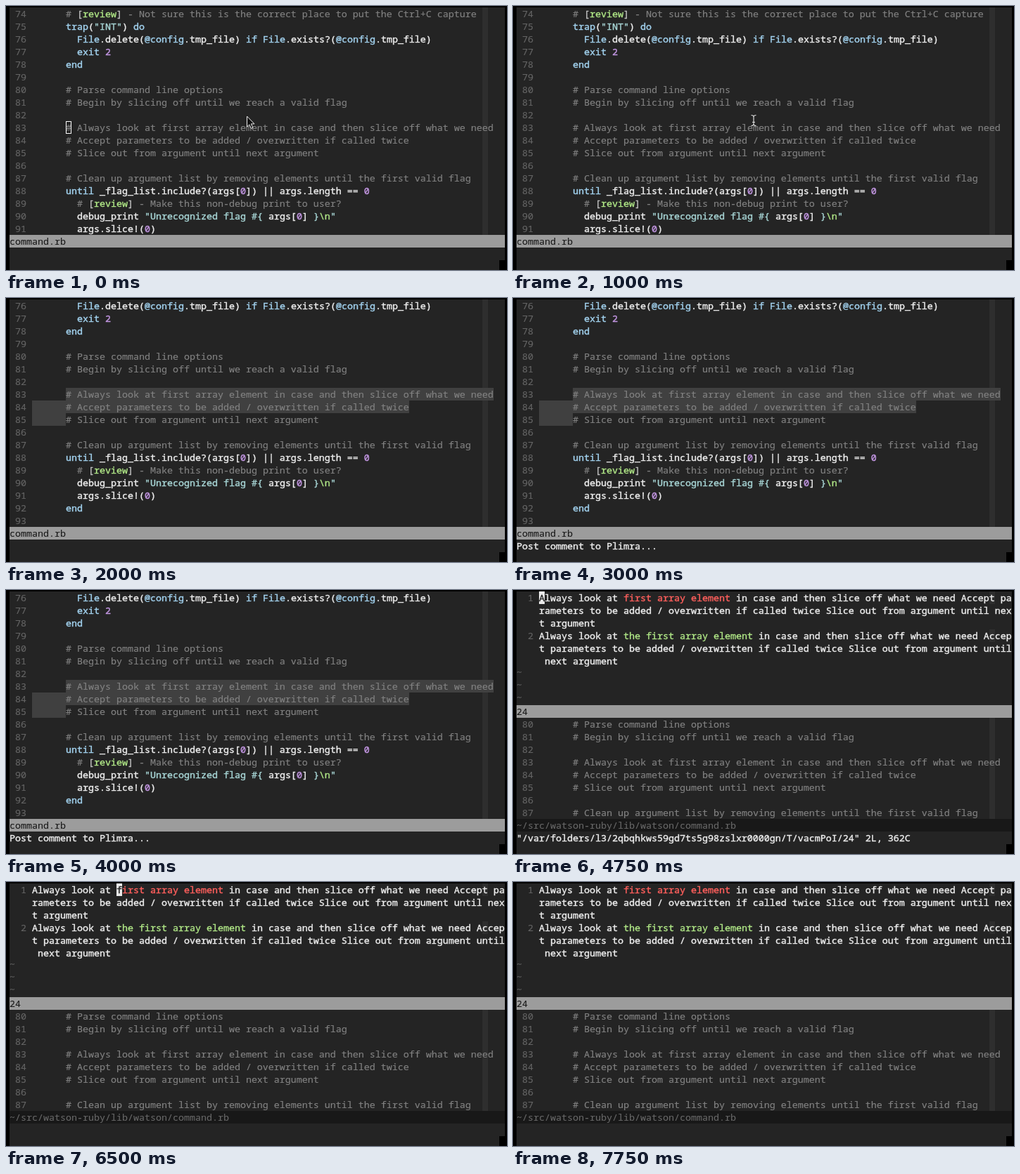
An HTML page that plays this animation: 712 by 376 pixels, repeating every 8000 ms.

```html
<!DOCTYPE html>
<html lang="en">
<head>
<meta charset="utf-8">
<title>Editor</title>
<style>
html, body { margin: 0; width: 100%; height: 100%; overflow: hidden; background: #000; }
#stage { position: relative; width: 712px; height: 376px; overflow: hidden; }
#stage, pre { font: 500 13.3333px/18px "Noto Sans Mono", monospace; color: #eee; -webkit-text-stroke-width: .4px; }
pre { margin: 0; position: absolute; left: 0; top: 0; white-space: pre; }
#stage div, #stage b, #stage svg { position: absolute; }
#stage b { width: 8px; height: 18px; font-weight: 500; background: #eaeaea; color: #222; }
#stage b.box { box-sizing: border-box; background: none; border: 1px solid #fff; }

#term { left: 5px; top: 2px; width: 704px; height: 374px; background: #242424; }
#notch { left: 701px; top: 362px; width: 11px; height: 14px; background: #000; }
.win { left: 0; width: 704px; overflow: hidden; background: #242424; }
.rule { left: 672px; width: 8px; background: #2e2e2e; }
.bar { left: 0; width: 704px; height: 18px; white-space: pre; background: #9c9c9c; color: #1a1a1a; -webkit-text-stroke-width: .1px; }
.bar.dim { background: #181818; color: #686868; }
.sel { height: 18px; background: #404040; }
.msg { left: 0; top: 342px; white-space: pre; }

.n { color: #646464; }
.c { color: #828282; }
.n, .c { -webkit-text-stroke-width: .15px; }
.b { color: #c4c4c4; }
.k { color: #a3d3f0; }
.s { color: #a8d6d6; }
.g { color: #b2ea88; }
.b, .g { -webkit-text-stroke-width: .35px; }
.p { color: #c497e4; }
.r { color: #ff5f5c; }
.t { color: #565656; position: relative; top: -2px; }

.timed { animation: 8s step-end infinite; opacity: 0; }
#lines { left: 0; top: 0; animation: scroll 8s step-end infinite; }
@keyframes scroll {
  0% { transform: none }
  18.75% { transform: translateY(-18px) }
  21.875%, 100% { transform: translateY(-36px) }
}
@keyframes single { 0% { opacity: 1 } 56.25%, 100% { opacity: 0 } }
@keyframes split { 0% { opacity: 0 } 56.25%, 100% { opacity: 1 } }
@keyframes unfocused { 0% { opacity: 1 } 6.25%, 100% { opacity: 0 } }
@keyframes beam { 0% { opacity: 0 } 6.25% { opacity: 1 } 18.75%, 100% { opacity: 0 } }
@keyframes blink83 { 0% { opacity: 0 } 6.25% { opacity: 1 } 12.5%, 100% { opacity: 0 } }
@keyframes down1 { 0% { opacity: 0 } 18.75% { opacity: 1 } 21.875%, 100% { opacity: 0 } }
@keyframes down2 { 0% { opacity: 0 } 21.875% { opacity: 1 } 25%, 100% { opacity: 0 } }
@keyframes sel1 { 0% { opacity: 0 } 18.75%, 100% { opacity: 1 } }
@keyframes sel2 { 0% { opacity: 0 } 21.875%, 100% { opacity: 1 } }
@keyframes post { 0% { opacity: 0 } 31.25% { opacity: 1 } 56.25%, 100% { opacity: 0 } }
@keyframes opened { 0% { opacity: 0 } 56.25% { opacity: 1 } 62.5%, 100% { opacity: 0 } }
@keyframes word1 { 0% { opacity: 0 } 56.25% { opacity: 1 } 65.625%, 100% { opacity: 0 } }
@keyframes word2 { 0% { opacity: 0 } 65.625% { opacity: 1 } 68.75%, 100% { opacity: 0 } }
@keyframes word3 { 0% { opacity: 0 } 68.75% { opacity: 1 } 71.875%, 100% { opacity: 0 } }
@keyframes word4 {
  0% { opacity: 0 } 71.875% { opacity: 1 } 84.375% { opacity: 0 }
  90.625% { opacity: 1 } 96.875%, 100% { opacity: 0 }
}
</style>
</head>
<body>
<div id="stage"></div>
<script>
const CW = 8, LH = 18, FIRST = 74, GUTTER = 4;

const source = String.raw`
      # [review] - Not sure this is the correct place to put the Ctrl+C capture
      trap("INT") do
        File.delete(@config.tmp_file) if File.exists?(@config.tmp_file)
        exit 2
      end

      # Parse command line options
      # Begin by slicing off until we reach a valid flag

      # Always look at first array element in case and then slice off what we need
      # Accept parameters to be added / overwritten if called twice
      # Slice out from argument until next argument

      # Clean up argument list by removing elements until the first valid flag
      until _flag_list.include?(args[0]) || args.length == 0
        # [review] - Make this non-debug print to user?
        debug_print "Unrecognized flag #{ args[0] }\n"
        args.slice!(0)
      end
`.slice(1).split("\n");

const span = (cls, text) => `<span class="${cls}">${text}</span>`;

const tokens = /(\b(?:trap|do|end|if|until|exit)\b|@\w+|\bFile\b)|("INT"|"Unrecognized flag |"|#\{|\})|(\\n)|(\d)/g;

function highlight(line) {
  if (/^\s*#/.test(line)) {
    return span("c", line.replace(/\[(\w+)\]/, (m, tag) => span("b", "[") + span("g", tag) + span("b", "]")));
  }
  return line.replace(tokens, (m, key, str, esc) => span(key ? "k" : str ? "s" : esc ? "g" : "p", m));
}

const listing = (from, to) => source.slice(from - FIRST, to - FIRST + 1)
  .map((line, i) => span("n", ` ${from + i} `) + highlight(line)).join("\n");

// Wraps one long line into the text area, colouring the given phrase.
function wrapped(num, text, phrase, cls) {
  const width = 88 - GUTTER, rows = [];
  for (let i = 0; i < text.length; i += width) {
    const row = text.slice(i, i + width);
    rows.push((i ? " ".repeat(GUTTER) : span("n", `  ${num} `)) + row.replace(phrase, span(cls, phrase)));
  }
  return rows.join("\n");
}

const at = (row, col) => `left:${col * CW}px;top:${row * LH}px;`;
const timed = name => `class="timed" style="animation-name:${name}"`;
const cursor = (name, row, col, ch) =>
  `<b class="timed" style="${at(row, col)}animation-name:${name}">${ch}</b>`;
const selection = (name, row, from, to) =>
  `<div class="sel timed" style="${at(row, from)}width:${(to - from) * CW}px;animation-name:${name}"></div>`;
const rule = (row, rows) => `<div class="rule" style="top:${row * LH}px;height:${rows * LH}px"></div>`;
const bar = (row, text, cls = "") => `<div class="bar ${cls}" style="top:${row * LH}px">${text}</div>`;
const message = (name, text) => `<div class="msg timed" style="animation-name:${name}">${text}</div>`;
const win = (row, rows, html) => `<div class="win" style="top:${row * LH}px;height:${rows * LH}px">${html}</div>`;

const tail = " array element in case and then slice off what we need Accept parameters to be added / overwritten"
  + " if called twice Slice out from argument until next argument";

const single = win(0, 18, rule(0, 18) + `<div id="lines">`
  + selection("sel1", 9, 10, 86) + selection("sel1", 10, 4, 10)
  + selection("sel2", 10, 10, 71) + selection("sel2", 11, 4, 10)
  + `<pre>${listing(74, 93)}</pre>`
  + `<b class="box timed" style="${at(9, 10)}animation-name:unfocused"></b>`
  + cursor("blink83", 9, 10, "#") + cursor("down1", 10, 10, "#") + cursor("down2", 11, 10, "#")
  + `</div>`) + bar(18, "command.rb");

const split = win(0, 9, rule(0, 1) + rule(3, 1) + "<pre>"
  + wrapped(1, "Always look at first" + tail, "first array element", "r") + "\n"
  + wrapped(2, "Always look at the first" + tail, "the first array element", "g") + "\n"
  + span("t", "~\n~\n~") + "</pre>"
  + cursor("word1", 0, 4, "A") + cursor("word2", 0, 11, "l")
  + cursor("word3", 0, 16, "a") + cursor("word4", 0, 19, "f"))
  + bar(9, "24")
  + win(10, 8, rule(0, 8) + `<pre>${listing(80, 87)}</pre>`)
  + bar(18, "~/src/watson-ruby/lib/watson/command.rb", "dim");

const pointers = `<svg width="712" height="376" style="left:0;top:0">
  <path ${timed("unfocused")} d="M342.5 157v15l3.4-3.1 2.4 5.4 2.5-1.1-2.4-5.3h4.6z" fill="#111" stroke="#eee"/>
  <path ${timed("beam")} d="M338.5 155.5q3.5 0 3.5 2.5v10q0 2.500-3.500 2.500M345.500 155.500q-3.500 0-3.500 2.500M345.500 170.500q-3.500 0-3.500-2.500M340 165.500h4" fill="none" stroke="#ddd" stroke-width="1.2"/>
</svg>`;

document.getElementById("stage").innerHTML = `<div id="term">
  <div ${timed("single")}>${single}</div>
  <div ${timed("split")}>${split}</div>
  ${message("post", "Post comment to Plimra...")}
  ${message("opened", '"/var/folders/l3/2qbqhkws59gd7ts5g98zslxr0000gn/T/vacmPoI/24" 2L, 362C')}
</div><div id="notch"></div>${pointers}`;
</script>
</body>
</html>
```
